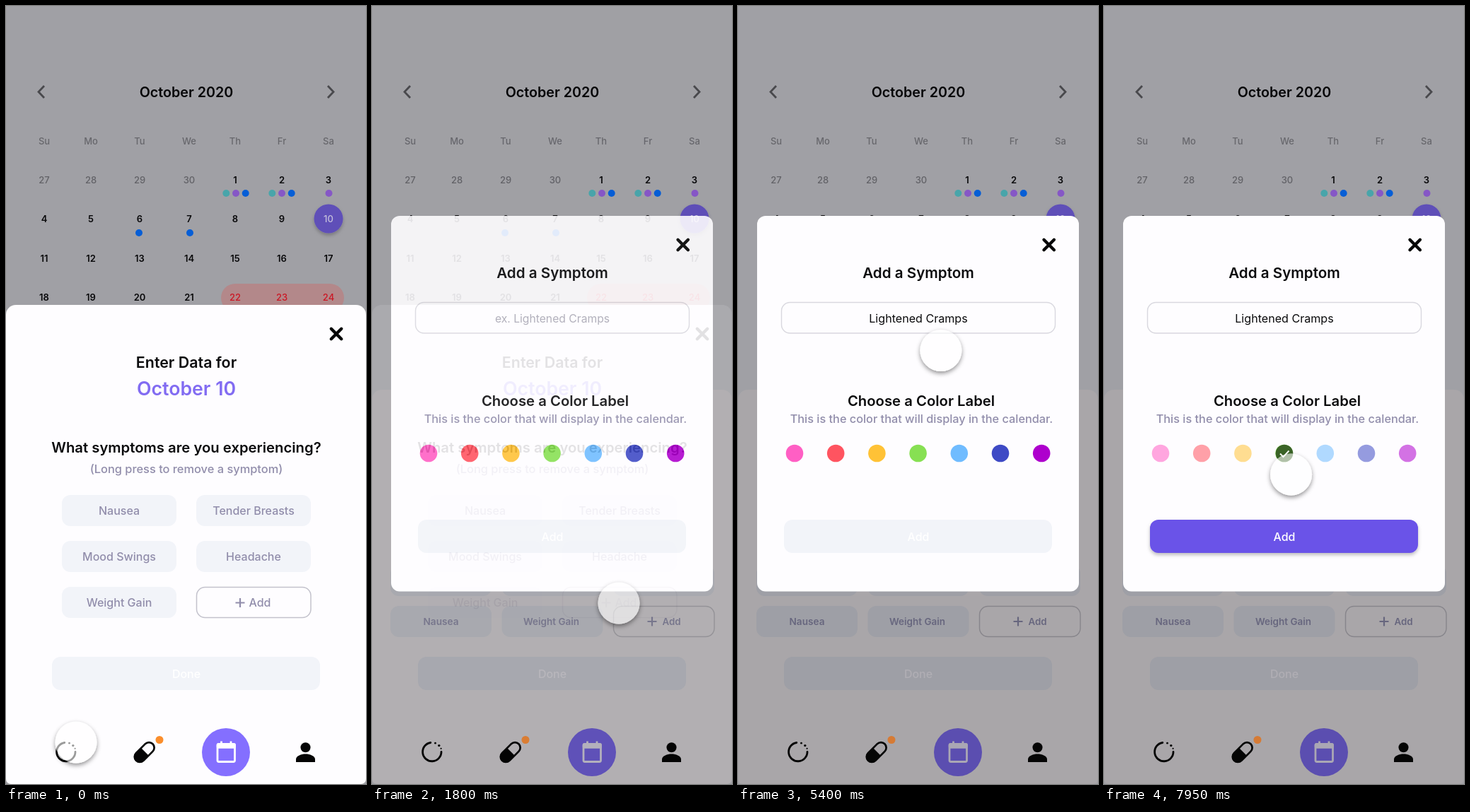
Recreate the animation shown at these times as an HTML page. Size 509x1101 px, loop 8 s.

```html
<!DOCTYPE html>
<html lang="en">
<head>
<meta charset="utf-8">
<title>Add a symptom</title>
<style>
html, body { margin: 0; width: 100%; height: 100%; overflow: hidden; background: #a0a0a5; }
svg { display: block; width: 100%; height: 100%; }
text { font-family: Inter, "Open Sans", sans-serif; text-anchor: middle; }
</style>
</head>
<body>
<svg id="stage" viewBox="0 0 509 1101" xmlns="http://www.w3.org/2000/svg"></svg>
<script>
const LOOP = 8000;
const stage = document.getElementById('stage');

// Markup helpers; text is placed by the middle of its capitals.
const text = (s, x, cy, size, fill, weight = 500, extra = '') =>
  `<text x="${x}" y="${cy + size * 0.36}" font-size="${size}" font-weight="${weight}" fill="${fill}" ${extra}>${s}</text>`;
const box = (x, y, w, h, r, fill, extra = '') =>
  `<rect x="${x}" y="${y}" width="${w}" height="${h}" rx="${r}" fill="${fill}" ${extra}/>`;
const dot = (x, y, r, fill, extra = '') =>
  `<circle cx="${x}" cy="${y}" r="${r}" fill="${fill}" ${extra}/>`;
const line = (d, color, width, extra = '') =>
  `<path d="${d}" fill="none" stroke="${color}" stroke-width="${width}" ${extra}/>`;
const cross = (x, y) =>
  line(`M${x - 7.2} ${y - 7.2}l14.4 14.4m0 -14.4l-14.4 14.4`, '#050505', 4.4, 'stroke-linecap="round"');
const plus = (x, y, color) =>
  line(`M${x - 6.5} ${y}h13m-6.5 -6.5v13`, color, 2.2);
const sheet = (y, fill) =>
  box(0, y, 509, 100, 14, fill) + box(0, y + 50, 509, 1051 - y, 7, fill);

const COLS = [54, 120, 189, 259, 324, 390, 456];
const TEAL = '#48a5aa', PURPLE = '#8657c6', BLUE = '#065ed6';
const ACCENT = '#5f50b8';

function calendar() {
  let out = box(0, 0, 509, 1101, 0, '#a0a0a5');
  out += line('M54 113l-8 8.5l8 8.5M455 113l8 8.5l-8 8.5', '#49494d', 2.8);
  out += text('October 2020', 255, 122, 19.7, '#050507', 600);
  ['Su', 'Mo', 'Tu', 'We', 'Th', 'Fr', 'Sa'].forEach((d, i) => {
    out += text(d, COLS[i], 191, 13, '#67676c');
  });
  out += box(304, 393, 174, 40, 20, '#b3888a');
  out += dot(456, 301, 20.5, ACCENT, 'filter="url(#soft)"');
  for (let i = 0; i < 28; i++) {
    const day = i < 4 ? 27 + i : i - 3;
    const old = i < 4, today = day === 10 && !old, red = i > 24;
    const fill = old ? '#626267' : today ? '#c5c0dc' : red ? '#cb1724' : '#08080a';
    out += text(day, COLS[i % 7], 246 + Math.floor(i / 7) * 55.6, 13, fill, old || today || red ? 500 : 600);
  }
  for (const x of [325, 390]) {
    [TEAL, PURPLE, BLUE].forEach((c, i) => { out += dot(x + (i - 1) * 13.7, 265, 5, c); });
  }
  return out + dot(456.5, 265, 5, PURPLE) + dot(188, 321, 5, BLUE) + dot(260, 321, 5, BLUE);
}

function nav(accent, light, badge, paper) {
  const ink = '#050505';
  return line('M98 1055.5a13.2 13.2 0 1 1 -15.2 -13', ink, 2.8, 'stroke-linecap="round"') +
    dot(89.5, 1043.2, 1.4, ink) + dot(94.8, 1046.6, 1.7, ink) + dot(97.6, 1050.8, 1.1, ink) +
    `<g transform="translate(195.7 1056) rotate(-45)">${box(-18, -8.8, 36, 17.6, 8.8, ink)}
      <path d="M1 -6.2h8a6.2 6.2 0 0 1 0 12.4h-8z" fill="${paper}"/></g>` +
    dot(217, 1038.5, 5.5, badge) +
    dot(311, 1056, 34, accent) +
    box(299, 1044.5, 24.5, 25, 2, 'none', `stroke="${light}" stroke-width="2.8"`) +
    box(297.8, 1043.2, 27, 7.6, 2, light) +
    line('M304.5 1040.5v6M318 1040.5v6', light, 2.8) +
    dot(423.5, 1049.2, 7, ink) +
    `<path d="M410 1070v-4c0 -5 8 -7.5 13.5 -7.5s13.5 2.5 13.5 7.5v4z" fill="${ink}"/>`;
}

function entrySheet() {
  const label = '#918dab';
  let out = sheet(423, '#fefdff') + cross(467, 464);
  out += text('Enter Data for', 255, 504, 21.4, '#0b0b0d', 600);
  out += text('October 10', 255, 541, 26.7, '#826cf2', 600);
  out += text('What symptoms are you experiencing?', 255, 625, 20.3, '#0b0b0d', 600);
  out += text('(Long press to remove a symptom)', 255, 655, 16.4, label);
  ['Nausea', 'Tender Breasts', 'Mood Swings', 'Headache', 'Weight Gain'].forEach((s, i) => {
    const x = 79 + (i % 2) * 190, y = 692 + Math.floor(i / 2) * 65;
    out += box(x, y, 162, 44, 12, '#f2f4f9') + text(s, x + 81, y + 22.5, 16, label);
  });
  out += box(269.5, 822.5, 161.5, 43, 12, 'none', 'stroke="#c3c2cc" stroke-width="1.5"');
  out += plus(331, 844.5, label) + text('Add', 359, 844.5, 16, label);
  out += box(65, 921, 379, 47, 12, '#f2f4f9') + text('Done', 255, 945, 16, '#ffffff');
  return out + nav('#846fff', '#ffffff', '#fb8e2c', '#fefdff');
}

function dimSheet() {
  const label = '#67667e', fill = '#9e9fa6';
  let out = sheet(543, '#a9a6a9');
  for (const x of [26, 183.5, 341]) {
    out += box(x, 791, 143, 44, 12, fill);
    out += x < 300 ? box(x, 849, 143, 44, 12, fill)
      : box(x + 0.5, 849.5, 142.5, 43, 12, 'none', 'stroke="#87858b" stroke-width="1.4"');
  }
  out += text('Nausea', 97.5, 871.5, 13.6, label, 600) + text('Weight Gain', 253.5, 871.5, 13.5, label, 600);
  out += plus(396, 871, label) + text('Add', 423.5, 871.5, 13.3, label, 600);
  out += box(65, 921, 379, 47, 12, fill) + text('Done', 255, 945, 16, '#b0aeb4');
  return out + nav('#5b4eb0', '#aaa7b4', '#d67b35', '#a9a6a9');
}

const SWATCHES = ['#ff5fc4', '#ff5460', '#ffc236', '#87e053', '#70bcff', '#3e4ac5', '#ae00cd'];

function modal() {
  let out = box(27, 297, 455, 531.5, 12, '#fefdff') + cross(439.7, 338);
  out += text('Add a Symptom', 255, 378, 20.6, '#0b0b0d', 600);
  out += box(61.5, 419.5, 387, 43.5, 12, '#fefdff', 'stroke="#d9d8df" stroke-width="1.4"');
  out += text('ex. Lightened Cramps', 255, 442, 15.7, '#a9a7b4', 400, 'id="hint"');
  out += text('Lightened Cramps', 255, 442, 16.1, '#0b0b0d', 400, 'id="value"');
  out += text('Choose a Color Label', 259, 558.5, 20.3, '#0b0b0d', 600);
  out += text('This is the color that will display in the calendar.', 259.5, 584, 16.3, '#918dab');
  SWATCHES.forEach((c, i) => {
    out += dot(80 + i * 58.2, 633, 12.3, c, i === 3 ? '' : 'class="swatch"');
  });
  out += box(65, 727, 379, 47, 12, '#f2f4f9');
  out += `<g id="chosen">${dot(255, 633, 12.3, '#3b6427')}
    ${line('M249 633.5l4.5 4.5l8 -8.5', '#ffffff', 2)}
    ${box(65, 727, 379, 47, 12, '#6b52e8', 'filter="url(#soft)"')}</g>`;
  return out + text('Add', 255, 751, 16, '#ffffff');
}

const shadow = (id, blur, alpha) =>
  `<filter id="${id}" x="-30%" y="-30%" width="160%" height="170%">
    <feDropShadow dx="0" dy="3" stdDeviation="${blur}" flood-color="#000" flood-opacity="${alpha}"/>
  </filter>`;

stage.innerHTML = `<defs>
  ${shadow('soft', 2.5, 0.25)}${shadow('deep', 3, 0.42)}
  <mask id="outside" maskUnits="userSpaceOnUse" x="0" y="0" width="509" height="1101">
    <rect width="509" height="1101" fill="#fff"/><circle id="hole" fill="#000"/>
  </mask>
</defs>
<g id="first">${calendar()}${entrySheet()}</g>
<g id="second">${calendar()}${dimSheet()}${modal()}</g>
<g mask="url(#outside)"><circle id="shade" fill="#ddd" filter="url(#deep)"/></g>
<circle id="pointer" fill="#fff"/>`;

const get = id => document.getElementById(id);
const [second, hint, value, chosen, hole, shade, pointer] =
  ['second', 'hint', 'value', 'chosen', 'hole', 'shade', 'pointer'].map(get);
const swatches = stage.querySelectorAll('.swatch');

const ramp = (t, a, b) => Math.min(1, Math.max(0, (t - a) / (b - a)));
const ease = p => p < 0.5 ? 4 * p ** 3 : 1 - 4 * (1 - p) ** 3;
const fadeOut = p => 1 - (1 - p) ** 2;

// Pointer moves: start, end, target x, target y.
const MOVES = [
  [0, 950, 349, 847],
  [1050, 1700, 349, 845],
  [2345, 3245, 307, 444],
  [3900, 5000, 297, 444],
  [5090, 5890, 254, 629],
  [7700, 8300, 290, 745]
];
const PRESSES = [1250, 3500, 6640];

function pointerAt(t) {
  let x = 99, y = 1042;
  for (const [a, b, tx, ty] of MOVES) {
    const p = ease(ramp(t, a, b));
    x += (tx - x) * p;
    y += (ty - y) * p;
  }
  const press = Math.max(...PRESSES.map(a => Math.sin(Math.PI * ramp(t, a, a + 340))));
  return { x, y, press };
}

function draw(t) {
  second.setAttribute('opacity', fadeOut(ramp(t, 1600, 1900)));
  const typed = ease(ramp(t, 3900, 4200));
  hint.setAttribute('opacity', 1 - typed);
  value.setAttribute('opacity', typed);
  const picked = fadeOut(ramp(t, 7000, 7300));
  chosen.setAttribute('opacity', picked);
  swatches.forEach(s => s.setAttribute('opacity', 1 - 0.45 * picked));

  const { x, y, press } = pointerAt(t);
  for (const c of [hole, shade, pointer]) {
    c.setAttribute('cx', x);
    c.setAttribute('cy', y);
    c.setAttribute('r', 29.5 - 2 * press);
  }
  pointer.setAttribute('opacity', 0.6 - 0.36 * press);
}

const start = performance.now();
function tick() {
  draw((performance.now() - start) % LOOP);
  requestAnimationFrame(tick);
}
draw(0);
requestAnimationFrame(tick);
</script>
</body>
</html>
```
